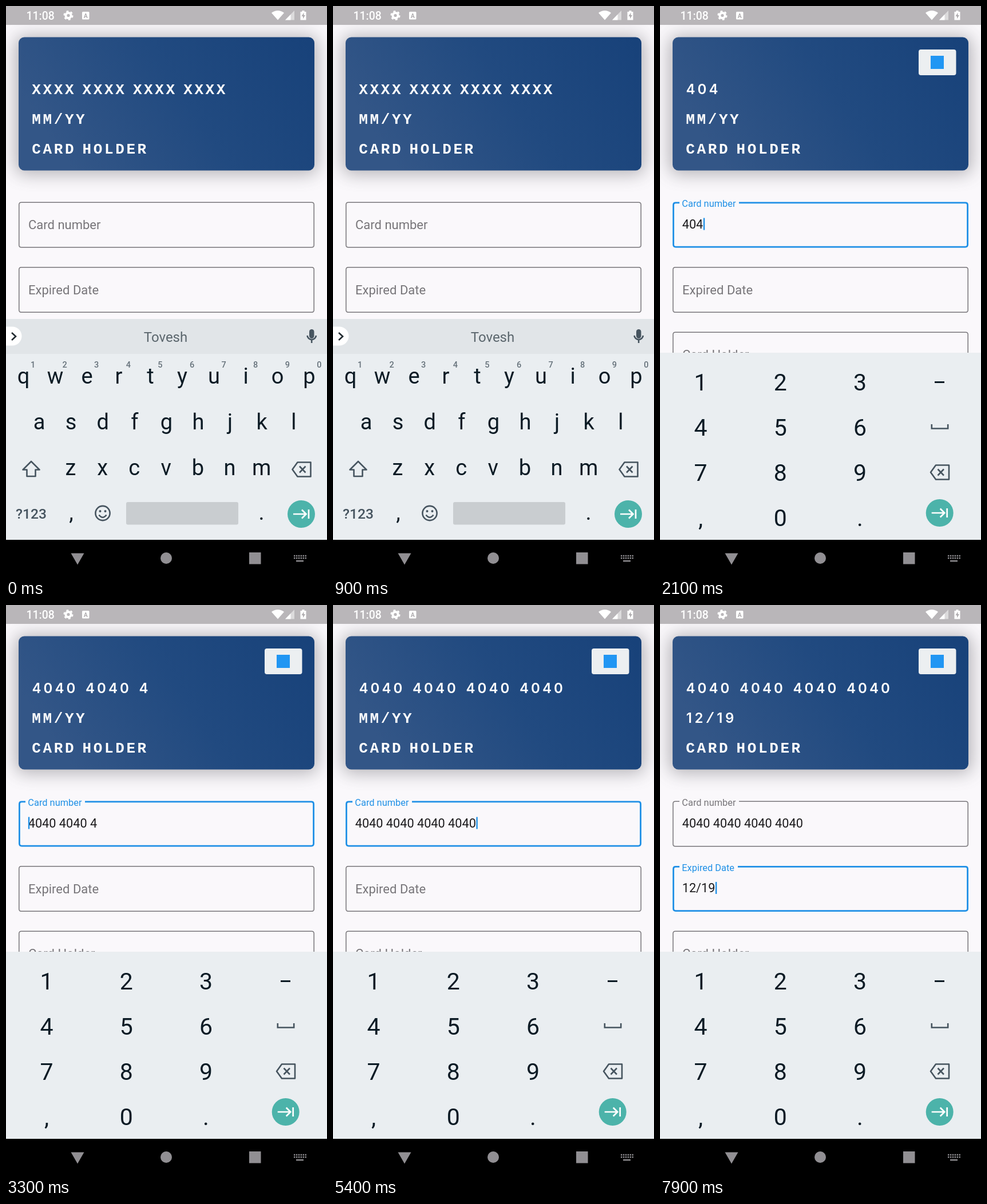
An HTML page for the animation above (8000 ms loop, 561 by 998 pixels).

```html
<!DOCTYPE html>
<html lang="en">
<head>
<meta charset="utf-8">
<title>Card form</title>
<style>
  html, body { margin: 0; width: 100%; height: 100%; overflow: hidden; background: #faf8fb; }
  svg { display: block; width: 100vw; height: 100vh; }
  text { font-family: Roboto, sans-serif; white-space: pre; }
  .mid { text-anchor: middle; }
  .emboss { fill: #fff; text-anchor: middle; }
  .letter { font: 700 26px "Liberation Mono", monospace; }
  .digit { font: 600 24px Inter, sans-serif; }
  .key { font-size: 38px; fill: #0c1b25; text-anchor: middle; }
  .num { font-size: 41px; }
  .tiny { font-size: 14.5px; font-weight: 500; fill: #65717a; text-anchor: middle; }
  .icon { fill: none; stroke: #46545f; stroke-width: 2.6; }
  .value { font-size: 21.7px; fill: #1b1a1c; }
  .hint { font-size: 21.7px; fill: #7b797c; }
</style>
</head>
<body>
<svg viewBox="0 0 561 998" preserveAspectRatio="none">
  <defs>
    <linearGradient id="blue" x1="0" y1=".4" x2="1" y2=".1">
      <stop offset="0" stop-color="#335687"/>
      <stop offset=".5" stop-color="#214a80"/>
      <stop offset="1" stop-color="#18427a"/>
    </linearGradient>
    <filter id="blur" x="-20%" y="-30%" width="140%" height="160%"><feGaussianBlur stdDeviation="15"/></filter>
    <filter id="soft" x="-10%" y="-20%" width="120%" height="150%"><feGaussianBlur stdDeviation="2"/></filter>
    <g id="erase" class="icon">
      <path d="M-7-12.5H16V12.5H-7L-16 0Z" stroke-linejoin="round"/>
      <path d="M-3.5-5.5 7 5.5M7-5.5-3.5 5.5"/>
    </g>
    <g id="next">
      <circle r="24" fill="#4cb3aa"/>
      <path d="M-14 0H8M1-7.5 8.5 0 1 7.5M13-8V8" fill="none" stroke="#fff" stroke-width="2.7"/>
    </g>
  </defs>

  <rect width="561" height="998" fill="#faf8fb"/>
  <rect x="16" y="52" width="529" height="242" rx="16" fill="#55535a" opacity=".42" filter="url(#blur)"/>
  <rect width="561" height="33" fill="#b9b6b9"/>
  <g fill="#fff">
    <text x="35.5" y="24" font-size="19.4" font-weight="500">11:08</text>
    <circle cx="109" cy="16.5" r="4.6" fill="none" stroke="#fff" stroke-width="4"/>
    <circle cx="109" cy="16.5" r="7.3" fill="none" stroke="#fff" stroke-width="2.6" stroke-dasharray="3.82 3.82"/>
    <rect x="133" y="10" width="12.5" height="13.5" rx="1.5"/>
    <text x="139.2" y="20.5" class="mid" font-size="10.5" font-weight="700" fill="#b0adb0">A</text>
    <path d="M464 12Q475 4 486 12L475 24.5Z"/>
    <path d="M488 24.5 504 8V24.5Z" opacity=".5"/>
    <path d="M488 24.5 497.5 14.7V24.5Z"/>
    <path d="M514.5 10H517.5V8H521.5V10H524.5V24.5H514.5Z"/>
    <path d="M520.5 11.5 516.5 18H519V22.5L523 16H520.5Z" fill="#b0adb0"/>
  </g>
  <rect x="22" y="54.5" width="517" height="233" rx="10" fill="url(#blue)"/>

  <g id="form"></g>
  <g id="letters"></g>
  <g id="numbers"></g>

  <rect y="933" width="561" height="65"/>
  <g fill="#918f93">
    <path d="M113.5 956.5H136.5L125 976.5Z"/>
    <circle cx="280" cy="965" r="10"/>
    <rect x="425" y="955" width="20.5" height="20.5"/>
    <path d="M503 961H525M503 965H525" stroke="#918f93" stroke-width="2.4" stroke-dasharray="2.4 1.5"/>
    <path d="M507 970H520" stroke="#918f93" stroke-width="2.4"/>
  </g>
</svg>
<script>
const LOOP = 8000, STEP = 100;
const GRAY = '#777579', BLUE = '#1f90e6';
const CARD_TIMES = [1700, 1900, 2100, 2300, 2500, 2800, 2900, 3100, 3300, 3600, 3800, 4000, 4200, 4500, 4900, 5400];
const DATE_TIMES = [6700, 6900, 7500, 7900];
const $ = id => document.getElementById(id);
const label = (cls, x, y, s, extra = '') => `<text class="${cls}" x="${x}" y="${y}" ${extra}>${s}</text>`;
const rowOf = (chars, x, dx, y, cls) => [...chars].map((c, i) => label(cls, x + i * dx, y, c)).join('');
const use = (id, x, y) => `<use href="#${id}" x="${x}" y="${y}"/>`;

function lettersKeyboard() {
  return `<rect y="547" width="561" height="386" fill="#eaeef1"/>
    <rect y="547" width="561" height="61" fill="#e1e5e8"/>
    <path d="M0 560.5H11A16.5 16.5 0 0 1 11 593.5H0Z" fill="#fff"/>
    <path d="M10 571 17 577.5 10 584" fill="none" stroke="#222b31" stroke-width="2.6"/>
    ${label('mid', 279, 587, 'Tovesh', 'font-size="24" fill="#5b666d"')}
    <rect x="530" y="565" width="8.5" height="16" rx="4.2" fill="#46545f"/>
    <path d="M526.5 576A7.8 8 0 0 0 542 576M534.2 584V589" class="icon" stroke-width="2.2"/>`
    + rowOf('qwertyuiop', 30.5, 55.5, 660, 'key') + rowOf('1234567890', 47, 55.6, 632, 'tiny')
    + rowOf('asdfghjkl', 58, 55.6, 739.5, 'key') + rowOf('zxcvbnm', 113, 55.6, 820, 'key')
    + `<path d="M44 796 58.5 810.5H51.5V822H36.5V810.5H29.5Z" class="icon" stroke-linejoin="round"/>`
    + use('erase', 516.5, 810)
    + label('mid', 44, 895.5, '?123', 'font-size="24.6" font-weight="500" fill="#46545f"')
    + label('key', 114, 898, ',') + label('key', 446.5, 898, '.')
    + `<g class="icon"><circle cx="169" cy="886.5" r="12.6"/><path d="M162.5 889.5Q169 898 175.5 889.5"/></g>
    <circle cx="164.5" cy="883" r="2" fill="#46545f"/><circle cx="173.5" cy="883" r="2" fill="#46545f"/>
    <rect x="210" y="867" width="196" height="39.5" rx="3" fill="#c9cdd0"/>` + use('next', 516, 888);
}

function numbersKeyboard() {
  const rows = ['123', '456', '789', ',0.'];
  return '<rect y="606" width="561" height="327" fill="#eaeef1"/>'
    + rows.map((r, i) => rowOf(r, 71, 139.2, 672 + i * 79, 'key num')).join('')
    + `<path d="M480 657.5H497" stroke="#0c1b25" stroke-width="3"/>
    <path d="M474.8 731V738.5H503.2V731" class="icon"/>` + use('erase', 489, 815) + use('next', 488.7, 886);
}

// Card lettering: each character has its own advance width.
function emboss(s, y) {
  let x = 45, prev = '';
  return [...s].map(c => {
    const digit = /\d/.test(c);
    const adv = c === ' ' ? (/\d/.test(prev) ? 13.5 : 11.5) : c === '1' ? 14.5 : digit ? 20 : 19.2;
    const out = c === ' ' ? '' : label('emboss ' + (digit ? 'digit' : 'letter'), x + (adv - 3) / 2, y, c);
    x += adv;
    prev = c;
    return out;
  }).join('');
}

// Outlined field; up (0..1) lifts the label into a gap in the border.
function field({ top, title, wide, up = 0, focus = false, hint = '', value = '', caret = null }) {
  const color = focus ? BLUE : GRAY, w = focus ? 2.8 : 1.5;
  const l = 22 + w / 2, r = 539 - w / 2, t = top + w / 2, b = top + 80 - w / 2;
  const gap = up ? 34 + (wide + 10) * up : 34;
  const lx = 39 - up * 0.7, ly = top + 47.5 - up * 38.8, size = 22 - 5.6 * up;
  const border = `M${gap} ${t}H${r - 4}Q${r} ${t} ${r} ${t + 4}V${b - 4}Q${r} ${b} ${r - 4} ${b}H${l + 4}Q${l} ${b} ${l} ${b - 4}V${t + 4}Q${l} ${t} ${l + 4} ${t}H34`;
  return `<path d="${border}" fill="none" stroke="${color}" stroke-width="${w}"/>`
    + label('', lx, ly, title, `font-size="${size}" fill="${color === BLUE && up > .2 ? BLUE : GRAY}"`)
    + (value ? label('value', 38.7, top + 46, value) : hint ? label('hint', 38.7, top + 46.5, hint, `opacity="${up}"`) : '')
    + (caret === null ? '' : `<rect x="${caret}" y="${top + 28}" width="2.4" height="21" fill="${BLUE}"/>`);
}

const countBy = (times, t) => times.filter(at => at <= t).length;
const rise = (t, start, span) => {
  const p = Math.min(1, Math.max(0, (t - start + 50) / span));
  return p * p * (3 - 2 * p);
};
// The caret falls back to the start whenever a separator has just been added.
function caretAt(s, jumped) {
  if (!s || jumped) return 38.8;
  return [...s].reduce((x, c) => x + (c === ' ' ? 5.4 : c === '/' ? 8.9 : 12.18), 39.3);
}

function draw(t) {
  const n = countBy(CARD_TIMES, t), m = countBy(DATE_TIMES, t);
  const number = '4040 4040 4040 4040'.slice(0, n + Math.floor(Math.max(0, n - 1) / 4));
  const date = '12/19'.slice(0, m > 2 ? m + 1 : m);
  const onCard = t >= 1000 && t < 5900, onDate = t >= 5900;
  const badge = t < 1700 ? 0 : Math.min(1, (t - 1600) / 300);

  $('form').innerHTML = emboss(number || 'XXXX XXXX XXXX XXXX', 154)
    + emboss(date || 'MM/YY', 206) + emboss('CARD HOLDER', 258)
    + `<g opacity="${badge}"><rect x="452" y="76" width="65.5" height="45" rx="4" fill="#eceff1"/>
       <rect x="473" y="87" width="23" height="23" fill="#2196f3"/></g>`
    + field({ top: 342.5, title: 'Card number', wide: 94, up: rise(t, 1000, 200), focus: onCard,
        hint: 'xxxx xxxx xxxx xxxx', value: number, caret: onCard ? caretAt(number, n > 1 && n % 4 === 1) : null })
    + field({ top: 456, title: 'Expired Date', wide: 92, up: rise(t, 5900, 300), focus: onDate,
        hint: 'MM/YY', value: date, caret: onDate ? caretAt(date, m === 3) : null })
    + field({ top: 569.5, title: 'Card Holder', wide: 84 })
    + (t >= 1200 && t < 1700 ? `<rect x="11" y="310" width="121" height="59" rx="2" opacity=".16" filter="url(#soft)"/>
       <rect x="11" y="308.5" width="121" height="59.5" rx="2" fill="#faf9fa"/>`
       + label('', 41, 345, 'PASTE', 'font-size="18.6" font-weight="500" fill="#111"') : '');
  $('letters').style.display = t < 1200 ? '' : 'none';
  $('numbers').style.display = t < 1200 ? 'none' : '';
}

$('letters').innerHTML = lettersKeyboard();
$('numbers').innerHTML = numbersKeyboard();
const begin = performance.now();
let shown = -1;
function tick() {
  const t = Math.floor((performance.now() - begin) % LOOP / STEP) * STEP;
  if (t !== shown) draw(shown = t);
  requestAnimationFrame(tick);
}
tick();
</script>
</body>
</html>
```
